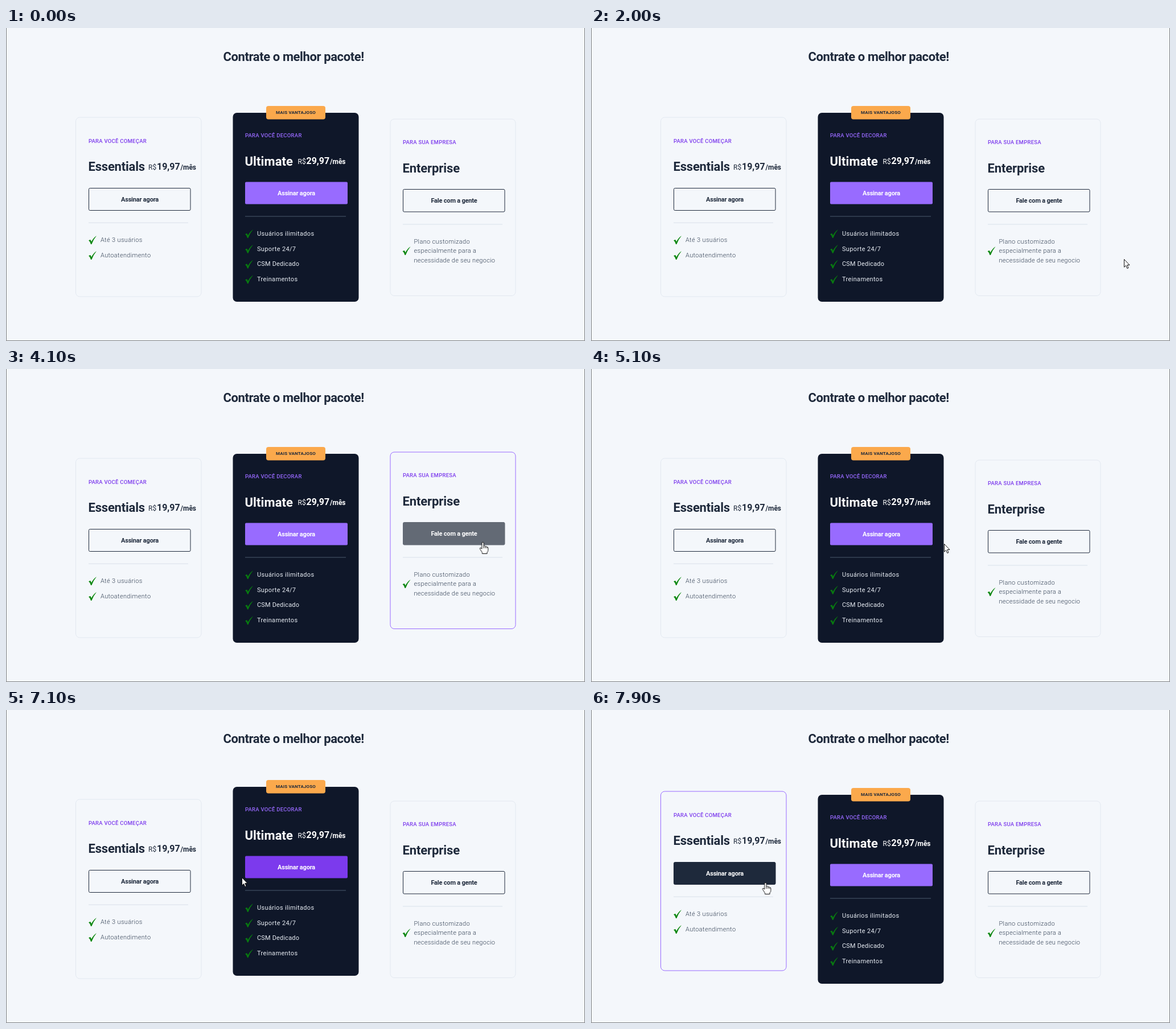
Animation, 1017 px wide and 550 px high, one loop 8000 ms. Source, as an HTML page:

```html
<!DOCTYPE html>
<html lang="pt-BR">
<head>
<meta charset="utf-8">
<title>Pacotes</title>
<style>
html, body { margin: 0; height: 100%; overflow: hidden; background: #f4f7fb; }
svg { display: block; width: 100vw; height: 100vh; font-family: Roboto, "Open Sans", sans-serif; }
text { stroke: none; fill: #1e293b; }

.title { font: 700 22px Roboto, sans-serif; letter-spacing: -.4px; }
.name { font: 700 22px Roboto, sans-serif; letter-spacing: -.2px; }
.label { font-weight: 500; font-size: 9.5px; letter-spacing: .25px; fill: #7c3aed; }
.cur { font-size: 12px; }
.sum { font-weight: 700; font-size: 16px; }
.per { font-weight: 700; font-size: 12px; }
.item { font-weight: 300; font-size: 11px; letter-spacing: .34px; fill: #334155; }
.badge { font-weight: 700; font-size: 8px; letter-spacing: .15px; text-anchor: middle; }

.box { fill: none; stroke: inherit; }
.card { stroke: #e2e8f0; }
.rule { stroke: #e2e8f0; stroke-width: 1.5; }
.tick { fill: #0b870f; stroke: none; }
.dark text { fill: #fff; }
.dark .label { fill: #9869ff; }
.dark .item { font-weight: 400; fill: #e8edf4; }
.dark .rule { stroke: #364357; }
.dark .tick { fill: #087a10; }
.dark .badge { fill: #1e293b; }

.btn { fill: #f4f7fb; stroke: #1e293b; color: #1e293b; }
.btn text, .dark .btn text { fill: currentColor; font-weight: 700; font-size: 11px; letter-spacing: -.2px; text-anchor: middle; }
.dark .btn { fill: #986bff; stroke: none; color: #fff; }

.card, .btn, #arrow, #hand, #pointer { animation: 8s step-end infinite; }
#left { animation-name: lift-left; }
#mid { animation-name: lift-mid; }
#right { animation-name: lift-right; }
#left .btn { animation-name: btn-left; }
#mid .btn { animation-name: btn-mid; }
#right .btn { animation-name: btn-right; }
#pointer { animation-name: travel; }
#arrow { animation-name: arrow; }
#hand { animation-name: hand; }

@keyframes lift-right {
  0%, 63.75%, 100% { transform: none; stroke: #e2e8f0; }
  32.5%, 62.5% { transform: translateY(-7px); stroke: #bda9f8; }
  33.75% { transform: translateY(-14px); stroke: #986bff; }
}
@keyframes lift-mid {
  0%, 91.25%, 100% { transform: none; }
  65%, 90% { transform: translateY(-7px); }
  66.25% { transform: translateY(-14px); }
}
@keyframes lift-left {
  0% { transform: none; stroke: #e2e8f0; }
  91.25% { transform: translateY(-7px); stroke: #bda9f8; }
  92.5%, 100% { transform: translateY(-14px); stroke: #986bff; }
}
@keyframes btn-right {
  0%, 62.5%, 100% { fill: #f4f7fb; stroke: #1e293b; color: #1e293b; }
  36.25%, 56.25% { fill: #1e293b; stroke: #1e293b; color: #fff; }
  51.25% { fill: #636a75; stroke: #636a75; color: #fff; }
}
@keyframes btn-mid {
  0%, 90%, 100% { fill: #986bff; }
  66.25%, 82.5% { fill: #7c3aed; }
  76.25% { fill: #5a30b0; }
}
@keyframes btn-left {
  0% { fill: #f4f7fb; color: #1e293b; }
  92.5%, 100% { fill: #1e293b; color: #fff; }
}
@keyframes hand {
  0%, 62.5%, 88.75%, 100% { visibility: hidden; }
  36.25%, 65%, 92.5% { visibility: visible; }
}
@keyframes arrow {
  0%, 62.5%, 88.75%, 100% { visibility: visible; }
  36.25%, 65%, 92.5% { visibility: hidden; }
}
/* steps() keeps the pointer on a 100 ms beat */
@keyframes travel {
  0% { transform: translate(-50px, -50px); }
  6.25% { transform: translate(41px, 432px); animation-timing-function: steps(2); }
  8.75% { transform: translate(90px, 110px); animation-timing-function: steps(2); }
  11.25% { transform: translate(360px, 3px); animation-timing-function: steps(4); }
  16.25% { transform: translate(955px, 147px); animation-timing-function: steps(2); }
  18.75% { transform: translate(985px, 226px); }
  20% { transform: translate(985px, 226px); animation-timing-function: steps(4); }
  25% { transform: translate(936px, 406px); }
  27.5% { transform: translate(935px, 406px); }
  30% { transform: translate(943px, 398px); animation-timing-function: steps(2); }
  32.5% { transform: translate(870px, 330px); animation-timing-function: steps(3); }
  36.25% { transform: translate(837.5px, 304px); }
  57.5% { transform: translate(837.5px, 304px); animation-timing-function: steps(5); }
  63.75% { transform: translate(620px, 307px); animation-timing-function: steps(2); }
  66.25% { transform: translate(577px, 288px); }
  67.5% { transform: translate(577px, 288px); animation-timing-function: steps(2); }
  70% { transform: translate(569.5px, 283px); }
  85% { transform: translate(544.5px, 283px); }
  86.25% { transform: translate(544.5px, 283px); animation-timing-function: steps(2); }
  88.75% { transform: translate(414px, 294px); animation-timing-function: steps(2); }
  91.25% { transform: translate(340px, 299px); animation-timing-function: steps(2); }
  93.75% { transform: translate(308.5px, 303px); }
  97.5% { transform: translate(307.5px, 303px); }
  98.75%, 100% { transform: translate(306.5px, 303px); }
}
</style>
</head>
<body>
<svg viewBox="0 0 1017 550" preserveAspectRatio="none">
  <defs>
    <path id="tick" d="M0 8.5Q2.5 6.4 3.4 7.2Q4.3 8 4.9 10.6Q8.5 3.6 14 0Q8.2 7 5.4 15H4Q2.2 9.4 0 8.5Z"/>
  </defs>
  <rect width="1017" height="550" fill="#f4f7fb"/>

  <text class="title" x="381.5" y="58">Contrate o melhor pacote!</text>

  <g class="card" id="left">
    <rect class="box" x="122.5" y="157" width="220.5" height="315" rx="7"/>
    <text class="label" x="145" y="202">PARA VOCÊ COMEÇAR</text>
    <text class="name" x="144.5" y="251">Essentials</text>
    <text class="cur" x="250" y="248.5">R$</text>
    <text class="sum" x="265" y="248.5">19,97</text>
    <text class="per" x="306.5" y="248.5">/mês</text>
    <g class="btn">
      <rect x="145.5" y="281.5" width="178.5" height="39" rx="2"/>
      <text x="235" y="304.5">Assinar agora</text>
    </g>
    <path class="rule" d="M145 342.3H320"/>
    <use class="tick" href="#tick" x="145" y="365"/>
    <text class="item" x="166" y="376">Até 3 usuários</text>
    <use class="tick" href="#tick" x="145" y="392"/>
    <text class="item" x="166" y="403">Autoatendimento</text>
  </g>

  <g class="card dark" id="mid">
    <rect x="398.5" y="149" width="221" height="332" rx="7" fill="#0f1729" stroke="none"/>
    <rect x="457" y="137" width="104" height="23.5" rx="4" fill="#fba94c" stroke="none"/>
    <text class="badge" x="509" y="151">MAIS VANTAJOSO</text>
    <text class="label" x="420" y="191.5">PARA VOCÊ DECORAR</text>
    <text class="name" x="419.5" y="241.5" style="letter-spacing:.1px">Ultimate</text>
    <text class="cur" x="512.5" y="238.5">R$</text>
    <text class="sum" x="527.5" y="238.5">29,97</text>
    <text class="per" x="569" y="238.5">/mês</text>
    <g class="btn">
      <rect x="420" y="270.5" width="180" height="39" rx="2"/>
      <text x="510" y="294">Assinar agora</text>
    </g>
    <path class="rule" d="M420 331H597"/>
    <use class="tick" href="#tick" x="420" y="354"/>
    <text class="item" x="441" y="365">Usuários ilimitados</text>
    <use class="tick" href="#tick" x="420" y="380.7"/>
    <text class="item" x="441" y="391.5">Suporte 24/7</text>
    <use class="tick" href="#tick" x="420" y="407.4"/>
    <text class="item" x="441" y="418.3" style="letter-spacing:.16px">CSM Dedicado</text>
    <use class="tick" href="#tick" x="420" y="434.2"/>
    <text class="item" x="441" y="445">Treinamentos</text>
  </g>

  <g class="card" id="right">
    <rect class="box" x="675" y="160" width="220" height="310.5" rx="7"/>
    <text class="label" x="697" y="204">PARA SUA EMPRESA</text>
    <text class="name" x="696.5" y="254" style="letter-spacing:-.1px">Enterprise</text>
    <g class="btn">
      <rect x="697.5" y="283.5" width="178.5" height="39.5" rx="2"/>
      <text x="787" y="307">Fale com a gente</text>
    </g>
    <path class="rule" d="M697 345H872"/>
    <use class="tick" href="#tick" x="696.5" y="384"/>
    <text class="item" x="716.5" y="378.5">Plano customizado</text>
    <text class="item" x="716.5" y="395">especialmente para a</text>
    <text class="item" x="716.5" y="411.5" style="letter-spacing:.26px">necessidade de seu negocio</text>
  </g>

  <path d="M.5 0V549.5H1016.5V0" fill="none" stroke="#7b7d80"/>

  <g id="pointer" fill="#fff" stroke="#111" stroke-linejoin="round">
    <path id="arrow" d="M.5 .5V14.2L3.6 11.3L5.8 16.5L8 15.6L5.8 10.5H10Z"/>
    <path id="hand" d="M-1.7 2Q-1.7 .5 0 .5T1.7 2V7Q3.5 6 4.7 7.8Q6.6 7 7.4 8.8Q9.3 8.6 9.3 10.5V14.5Q9.3 17 7.5 18V20.5H-1V18.5L-4.8 12.5Q-5.8 10.5 -4 10L-1.7 12ZM1.7 7V11M4.7 8V11M7.4 9V11"/>
  </g>
</svg>
</body>
</html>
```
